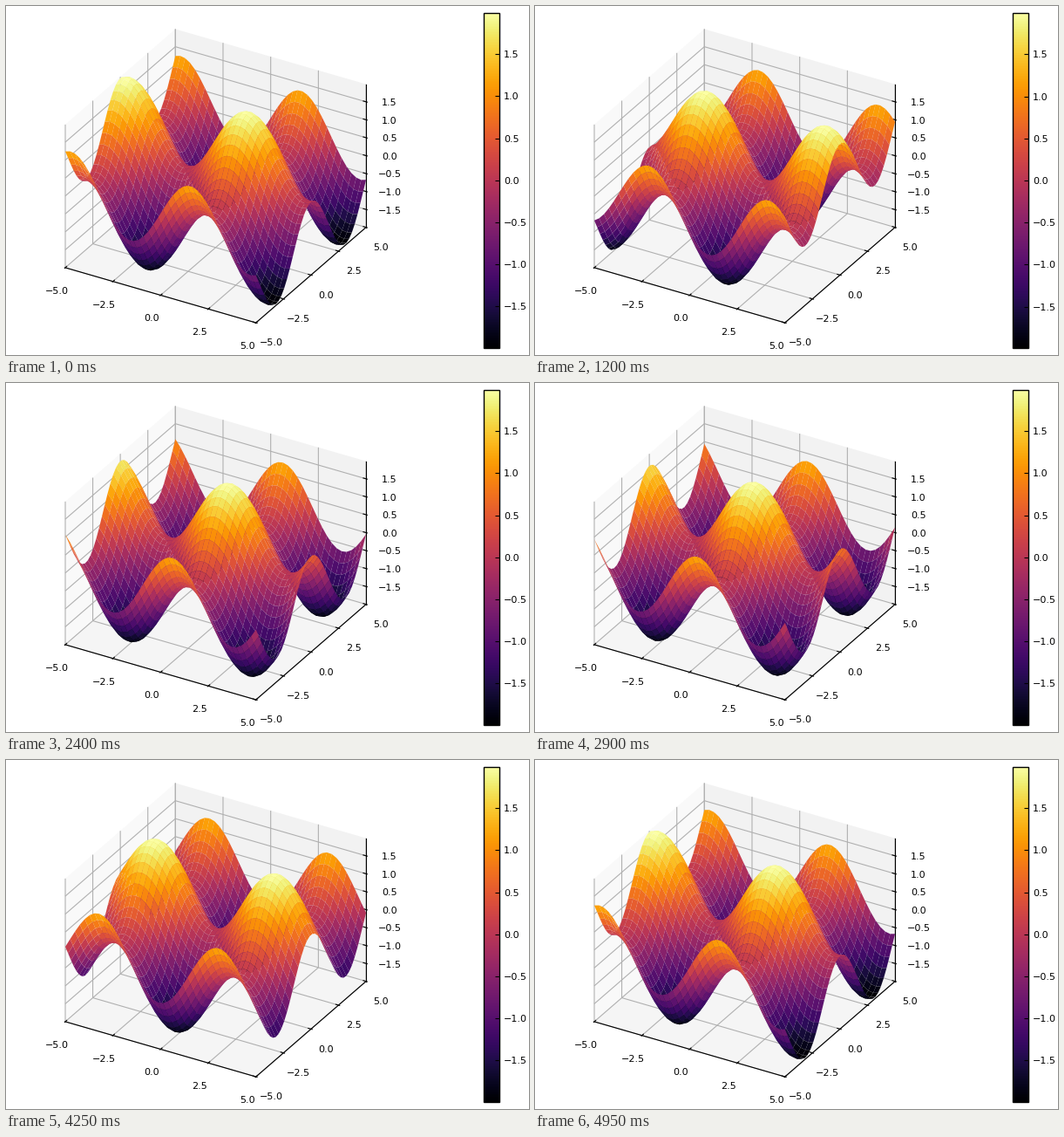
Animation of 600 by 400 pixels, one loop 5000 ms. Source, as a matplotlib script:

```python
import numpy as np
import matplotlib.pyplot as plt
from matplotlib.animation import FuncAnimation
from matplotlib.collections import LineCollection, PolyCollection

W, H, DPI = 600, 400, 100
FRAMES, INTERVAL = 100, 50
BAR_L, BAR_R, BAR_T, BAR_B = 548, 566, 8, 392
Z_TICKS = np.arange(-1.5, 1.6, 0.5)
XY_TICKS = np.arange(-5, 5.1, 2.5)
TICK_IN, TICK_OUT = 1 / 6, 1 / 12
GRID = "#b0b0b0"

plt.rcParams["font.family"] = "DejaVu Sans"
plt.rcParams["font.size"] = 8


def project(x, y, h):
    """Orthographic view; h is the height as a fraction of the box."""
    a, b = (x + 5) / 10, (y + 5) / 10
    u = 68 + 218.75 * a + 126.3 * b
    v = 299.9 + 63.15 * a - 109.4 * b - 164.05 * h
    return u, v


def path(*points):
    return [project(*p) for p in points]


def label(value):
    return f"{value:.1f}".replace("-", "\u2212")


fig = plt.figure(figsize=(W / DPI, H / DPI), dpi=DPI, facecolor="white")
ax = fig.add_axes([0, 0, 1, 1])
ax.axis("off")


def add_lines(segments, color, zorder, width=0.8):
    lines = LineCollection(segments, colors=color, linewidths=width, zorder=zorder)
    ax.add_collection(lines, autolim=False)
    return lines


# Panes
left_wall = path((-5, -5, 0), (-5, 5, 0), (-5, 5, 1), (-5, -5, 1))
back_wall = path((-5, 5, 0), (5, 5, 0), (5, 5, 1), (-5, 5, 1))
floor = path((-5, -5, 0), (5, -5, 0), (5, 5, 0), (-5, 5, 0))
for pane, shade in ((left_wall, 0.975), (back_wall, 0.95), (floor, 0.9625)):
    ax.fill(*zip(*pane), color=str(shade), lw=0, zorder=1)

# Fixed grid, axis lines, ticks and labels
add_lines([path((t, -5, 0), (t, 5, 0), (t, 5, 1)) for t in XY_TICKS], GRID, 2)
add_lines([path((5, t, 0), (-5, t, 0), (-5, t, 1)) for t in XY_TICKS], GRID, 2)
for ends in (path((-5, -5, 0), (5, -5, 0)),
             path((5, -5, 0), (5, 5, 0)),
             path((5, 5, 0), (5, 5, 1))):
    ax.plot(*zip(*ends), color="black", lw=0.8, zorder=3)
add_lines([path((t, -5 + TICK_IN, 0), (t, -5 - TICK_OUT, 0)) for t in XY_TICKS],
          "black", 3)
add_lines([path((5 - TICK_IN, t, 0), (5 + TICK_OUT, t, 0)) for t in XY_TICKS],
          "black", 3)
for t in XY_TICKS:
    u, v = project(t, -5, 0)
    ax.text(u - 9.9, v + 22, label(t), ha="center", va="top")
    u, v = project(5, t, 0)
    ax.text(u + 17.2, v + 18.4, label(t), ha="center", va="top")

# Parts that follow the height range
z_grid = add_lines([], GRID, 2)
z_marks = add_lines([], "black", 3)
z_labels = [ax.text(0, 0, label(t), ha="center", va="top") for t in Z_TICKS]

# Colour bar
ax.imshow(np.linspace(1, 0, 256)[:, None], cmap="inferno", aspect="auto",
          extent=(BAR_L, BAR_R, BAR_B, BAR_T), interpolation="nearest", zorder=2)
ax.add_patch(plt.Rectangle((BAR_L, BAR_T), BAR_R - BAR_L, BAR_B - BAR_T,
                           fill=False, ec="black", lw=1, zorder=4))
bar_marks = add_lines([], "black", 4)
bar_labels = [ax.text(BAR_R + 5, 0, label(t), ha="left", va="center_baseline")
              for t in Z_TICKS]

# Surface, rows ordered from back to front
axis = np.linspace(-5, 5, 40)
X, Y = np.meshgrid(axis, axis[::-1])
surface = PolyCollection([], cmap="inferno", edgecolors="none", linewidths=0,
                         antialiaseds=True, zorder=5)
ax.add_collection(surface, autolim=False)

ax.set_xlim(0, W)
ax.set_ylim(H, 0)


def corners(grid):
    """The four corner values of every cell, one row per cell."""
    parts = grid[:-1, :-1], grid[:-1, 1:], grid[1:, 1:], grid[1:, :-1]
    return np.stack([p.ravel() for p in parts], axis=1)


def update(k):
    phase = 10 * np.sin(2 * np.pi * k / (FRAMES - 1))
    Z = np.sin(X + phase) + np.cos(Y)
    lo, hi = Z.min(), Z.max()

    u, v = project(X, Y, (Z - lo) / (hi - lo))
    surface.set_verts(np.stack([corners(u), corners(v)], axis=2))
    surface.set_array(corners(Z).mean(axis=1))
    surface.set_clim(lo, hi)

    levels = (Z_TICKS - lo) / (hi - lo)
    z_grid.set_segments([path((-5, -5, h), (-5, 5, h), (5, 5, h)) for h in levels])
    z_marks.set_segments([path((5 - TICK_IN, 5, h), (5 + TICK_OUT, 5, h))
                          for h in levels])
    heights = BAR_B - (BAR_B - BAR_T) * levels
    bar_marks.set_segments([[(BAR_R - 4.9, y), (BAR_R, y)] for y in heights])
    for h, y, z_text, bar_text in zip(levels, heights, z_labels, bar_labels):
        u, v = project(5, 5, h)
        z_text.set_position((u + 27, v - 3.6))
        bar_text.set_y(y)
    return []


anim = FuncAnimation(fig, update, frames=FRAMES, interval=INTERVAL,
                     init_func=lambda: update(0), repeat=True, blit=False)
plt.show()
```
